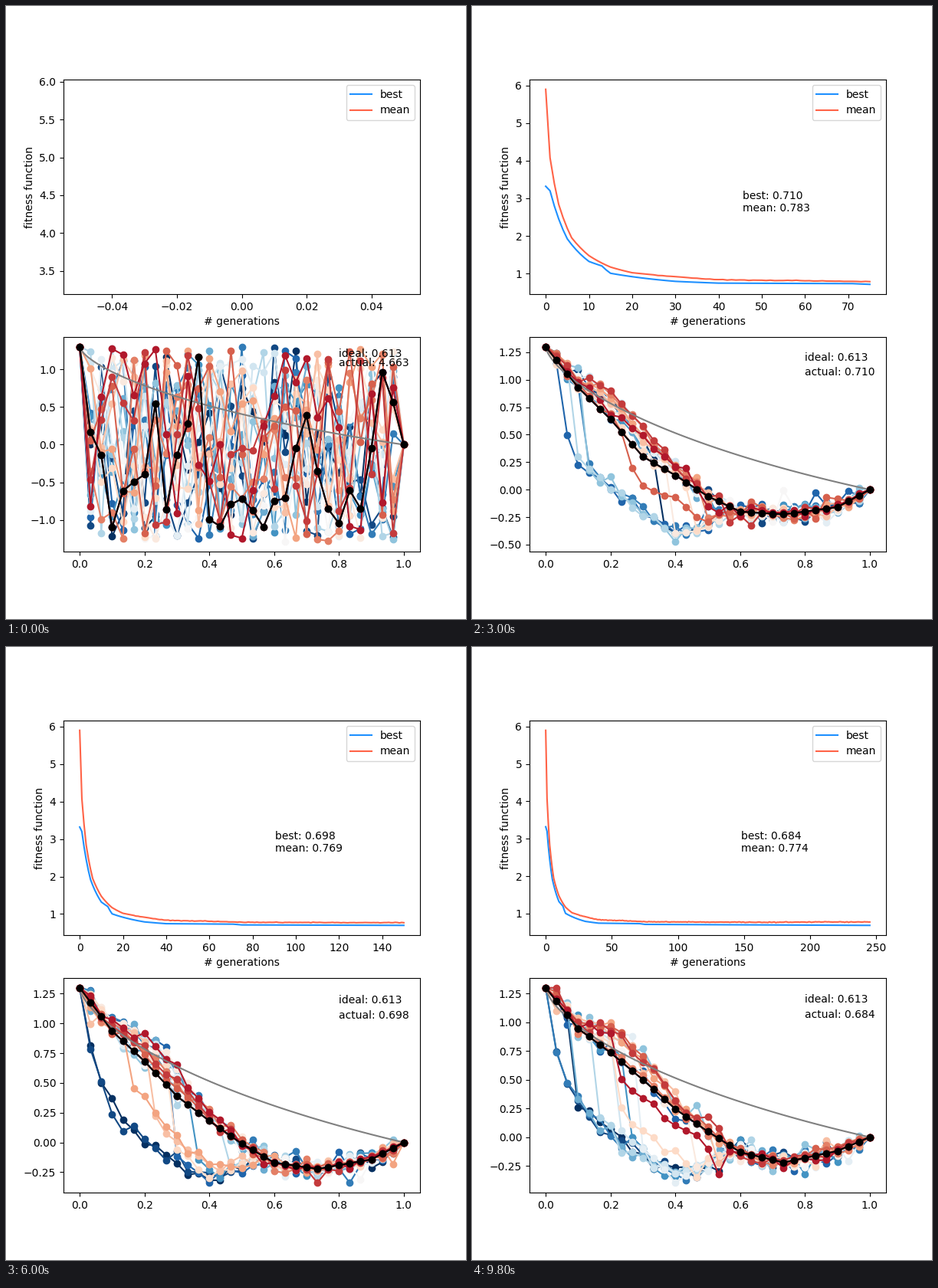
Recreate the animation shown at these times as a matplotlib script. Size 600 px wide and 800 px high, loop 10000 ms.

```python
import numpy as np
import matplotlib.pyplot as plt
from matplotlib.animation import FuncAnimation

FRAMES, INTERVAL, GENS_PER_FRAME = 50, 200, 5
SIZE, SEGMENTS, TOP = 20, 30, 1.3
X = np.linspace(0, 1, SEGMENTS + 1)
gens = np.arange((FRAMES - 1) * GENS_PER_FRAME + 1)


def decay(points, base=0.6):
    """Curve through (generation, value) points, exponential in between."""
    at, value = np.array(points).T
    return base + np.exp(np.interp(gens, at, np.log(value - base)))


best_fit = decay([(0, 3.32), (1, 3.2), (5, 1.92), (10, 1.32), (13, 1.2),
                  (15, 1.005), (30, 0.79), (40, 0.743), (71, 0.73), (75, 0.71),
                  (130, 0.701), (175, 0.694), (205, 0.686), (245, 0.684)])
mean_fit = decay([(0, 5.9), (1, 4.08), (3, 2.84), (6, 1.95), (10, 1.475),
                  (15, 1.17), (20, 1.02), (40, 0.837), (75, 0.783),
                  (130, 0.77), (175, 0.767), (205, 0.775), (245, 0.774)])
jitter = np.random.default_rng(5).normal(0, 0.005, gens.size) * (gens > 25)
jitter[::GENS_PER_FRAME] = 0
mean_fit += jitter

start_pop = np.random.default_rng(11).uniform(-1.29, TOP, (SIZE, X.size))

# Fittest path at three stages of the search, as heights at a few steps
KNOTS = np.array([0, 3, 6, 9, 12, 15, 18, 22, 27, 30]) / SEGMENTS
EARLY = np.array([TOP, .74, .34, .045, -.105, -.14, -.165, -.29, -.28, 0])
MIDDLE = np.array([TOP, .93, .64, .3, .13, -.06, -.2, -.225, -.16, 0])
LATE = np.array([TOP, .945, .735, .5, .245, .05, -.13, -.22, -.12, 0])


def cycloid():
    """Fastest descent from (0, TOP) to (1, 0)."""
    t = np.linspace(0.5, 3, 5000)
    ratio = (t - np.sin(t)) / (1 - np.cos(t))
    end = np.interp(1 / TOP, ratio, t)
    r = TOP / (1 - np.cos(end))
    t = np.linspace(0, end, 100)
    return r * (t - np.sin(t)), TOP - r * (1 - np.cos(t))


def bump(center, width):
    return np.exp(-((X - center) / width) ** 2)


def disorder(k):
    """Share of the random first generation still left."""
    settled = best_fit[40]
    share = (best_fit[k * GENS_PER_FRAME] - settled) / (best_fit[0] - settled)
    return max(share, 0)


def best_path(k):
    middle = EARLY + np.interp(k, [8, 15], [0, 1]) * (MIDDLE - EARLY)
    knots = middle + np.interp(k, [26, 35], [0, 1]) * (LATE - middle)
    return np.interp(X, KNOTS, knots)


def lowest(k):
    return np.interp(k, [0, 8, 15, 26, 35, 41, 49],
                     [-1.29, -.923, -.475, -.345, -.332, -.416, -.397])


def population(k):
    """Paths from least to most fit; each leaves the high route at its cut."""
    rng = np.random.default_rng(100 + k)
    best, floor, mix = best_path(k), lowest(k), disorder(k)
    high = best + 0.3 * bump(0.25, 0.15)
    low = TOP * np.exp(-X / 0.07) + 0.8 * floor * bump(0.42, 0.16)
    low = np.minimum(low, best)
    pop = np.empty((SIZE, X.size))
    for i in range(SIZE - 1):
        q = i / (SIZE - 1)
        upper = best + rng.uniform(-0.1, 1) * (high - best)
        lower = np.maximum(low, best - 0.1 - 0.9 * (1 - q))
        cut = rng.random() ** (2 - 1.4 * q)
        path = np.where(X < cut, upper, lower)
        path += rng.normal(0, 0.025 + 0.02 * (1 - q), X.size)
        path += (rng.random(X.size) < 0.08) * rng.normal(0, 0.07, X.size)
        pop[i] = path
    pop[-1] = best
    pop = mix * start_pop + (1 - mix) * pop
    pop[:, 0], pop[:, -1] = TOP, 0
    pop = np.clip(pop, floor, TOP)
    pop.flat[pop[:-1].argmin()] = floor
    return pop


fig, (ax_fit, ax_path) = plt.subplots(2, 1, figsize=(6, 8), dpi=100)
colors = plt.get_cmap("RdBu_r")(np.arange(SIZE) / SIZE)
ideal = cycloid()


def draw_fitness(gen):
    ax_fit.cla()
    shown = slice(0, gen + 1)
    ax_fit.plot(gens[shown], best_fit[shown], color="dodgerblue", label="best")
    ax_fit.plot(gens[shown], mean_fit[shown], color="tomato", label="mean")
    left = 0.6 * (gen + 1)
    ax_fit.text(left, 0.9 * best_fit[0], f"best: {best_fit[gen]:.3f}")
    ax_fit.text(left, 0.8 * best_fit[0], f"mean: {mean_fit[gen]:.3f}")
    ax_fit.set_xlabel("# generations")
    ax_fit.set_ylabel("fitness function")
    ax_fit.legend(loc="upper right")


def draw_paths(k, actual):
    ax_path.cla()
    pop = population(k)
    for path, color in zip(pop, colors):
        ax_path.plot(X, path, "o-", color=color)
    ax_path.plot(*ideal, color="gray")
    ax_path.plot(X, pop[-1], "o-", color="black")
    ax_path.text(0.8, 0.9 * TOP, "ideal: 0.613")
    ax_path.text(0.8, 0.8 * TOP, f"actual: {actual:.3f}")


def update(k):
    gen = k * GENS_PER_FRAME
    draw_fitness(gen)
    # the first generation is shown before it is ranked
    draw_paths(k, best_fit[gen] if k else 4.663)
    return []


anim = FuncAnimation(fig, update, frames=FRAMES, interval=INTERVAL, repeat=True)
plt.show()
```
